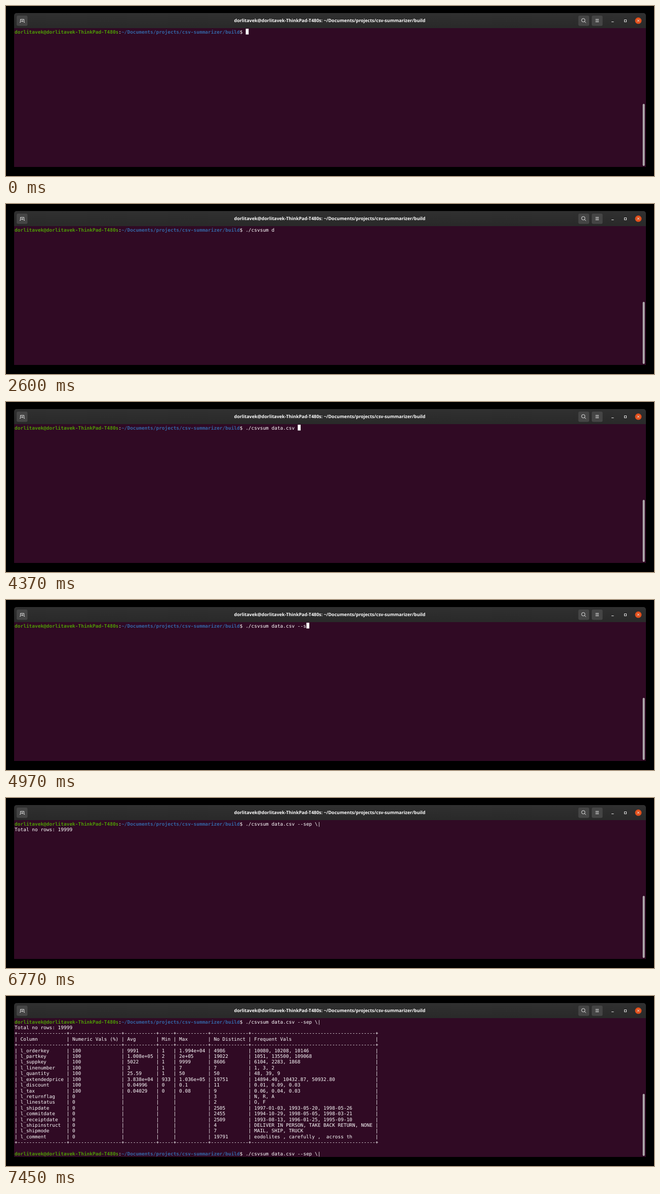
These frames come from a looping animation (1280 px wide and 338 px high, 8 s). An HTML page:

```html
<!DOCTYPE html>
<html lang="en">
<head>
<meta charset="utf-8">
<title>Terminal</title>
<style>
  html, body { margin: 0; width: 100%; height: 100%; overflow: hidden; background: #000; }
  svg { display: block; width: 1280px; height: 338px; }
  text { white-space: pre; text-rendering: geometricPrecision; fill: #fff; }
  .title { font: bold 8.97px "Open Sans", sans-serif; text-anchor: middle; }
  #screen text { font: 9.478px "DejaVu Sans Mono", monospace; }
  .user { fill: #4e9a06; font-weight: bold; }
  .path { fill: #3465a4; font-weight: bold; }
  .button { fill: #454545; }
  .icon { fill: none; stroke: #e4e4e4; }
</style>
</head>
<body>
<svg viewBox="0 0 1280 338">
  <defs>
    <linearGradient id="bar" x2="0" y2="1">
      <stop stop-color="#303030"/><stop offset="1" stop-color="#292929"/>
    </linearGradient>
    <rect id="button" width="21.5" height="20.5" rx="3"/>
  </defs>
  <path d="M16 44V19a5 5 0 0 1 5-5H1259a5 5 0 0 1 5 5V44z" fill="url(#bar)"/>
  <path d="M16 44H1264V320H16z" fill="#300a24"/>

  <g class="button">
    <use href="#button" x="21" y="19"/>
    <use href="#button" x="1130.5" y="19"/>
    <use href="#button" x="1157" y="19"/>
  </g>
  <g class="icon">
    <path d="M27 32.5h1.5v-6h7v6h1.5M32 28v4M30 30h4"/>
    <circle cx="1140.3" cy="28.3" r="3.4"/>
    <path d="M1142.8 30.8l2.7 2.7M1164.5 26.5h6.5m-6.5 2.5h6.5m-6.5 2.5h6.5M1196 31.5h4.5"/>
    <rect x="1221.5" y="27.5" width="4" height="4"/>
  </g>
  <circle cx="1249" cy="29.2" r="6.4" fill="#e2501c"/>
  <path class="icon" d="M1246.8 27l4.4 4.4m0-4.4l-4.4 4.4"/>
  <rect x="1257.7" y="194.5" width="4" height="123.5" rx="2" fill="#aeaaac"/>

  <text class="title" x="639.5" y="32.3">dorlitavek@dorlitavek-ThinkPad-T480s: ~/Documents/projects/csv-summarizer/build</text>
  <g id="screen"></g>
</svg>

<script>
const LEFT = 17.1, TOP = 45.2, CELL = 5.706, ROW = 2 * CELL, ASCENT = 9.4;
const LOOP = 8000, PROMPT_LENGTH = 80;
const PROMPT = '<tspan class="user">dorlitavek@dorlitavek-ThinkPad-T480s</tspan>:' +
  '<tspan class="path">~/Documents/projects/csv-summarizer/build</tspan>$ ';

// bursts of typing: text, start, time between keys
const BURSTS = [
  ['./', 790, 300], ['csv', 1420, 110], ['su', 1830, 110], ['m ', 2140, 110], ['d', 2600, 0],
  ['ata', 3070, 155], ['.csv ', 3960, 100], ['--s', 4720, 125], ['ep ', 5130, 90], ['\\|', 5850, 140]
];
const COMMAND = BURSTS.map(([text]) => text).join('');
const KEY_TIMES = BURSTS.flatMap(([text, start, gap]) => [...text].map((_, i) => start + i * gap));
const CURSOR_SPANS = [[0, 2140], [3960, 5310]];
const TOTAL_AT = 6770, TABLE_AT = 6870, RECALL_AT = 7450;

const RECORDS = `Column;Numeric Vals (%);Avg;Min;Max;No Distinct;Frequent Vals
l_orderkey;100;9991;1;1.994e+04;4986;10080, 10208, 10146
l_partkey;100;1.008e+05;2;2e+05;19022;1051, 135500, 109068
l_suppkey;100;5022;1;9999;8606;6104, 2283, 1868
l_linenumber;100;3;1;7;7;1, 3, 2
l_quantity;100;25.59;1;50;50;48, 39, 9
l_extendedprice;100;3.838e+04;933;1.036e+05;19751;14894.40, 10432.87, 50932.80
l_discount;100;0.04996;0;0.1;11;0.01, 0.09, 0.03
l_tax;100;0.04029;0;0.08;9;0.06, 0.04, 0.03
l_returnflag;0;;;;3;N, R, A
l_linestatus;0;;;;2;O, F
l_shipdate;0;;;;2505;1997-01-03, 1993-05-20, 1998-05-26
l_commitdate;0;;;;2455;1994-10-29, 1998-05-05, 1998-03-21
l_receiptdate;0;;;;2509;1993-08-13, 1996-01-25, 1995-09-10
l_shipinstruct;0;;;;4;DELIVER IN PERSON, TAKE BACK RETURN, NONE
l_shipmode;0;;;;7;MAIL, SHIP, TRUCK
l_comment;0;;;;19791;eodolites , carefully ,  across th`.split('\n').map(record => record.split(';'));

function tableLines() {
  const widths = RECORDS[0].map((_, i) => Math.max(...RECORDS.map(cells => cells[i].length)));
  const rule = '+' + widths.map(w => '-'.repeat(w + 2) + '+').join('');
  const [head, ...body] = RECORDS.map(cells =>
    '|' + cells.map((cell, i) => ` ${cell.padEnd(widths[i])} |`).join(''));
  return [rule, head, rule, ...body, rule];
}

const line = (content, row) =>
  `<text x="${LEFT}" y="${TOP + row * ROW + ASCENT}">${content}</text>`;

const output = [...tableLines(), '', PROMPT + '<tspan id="recalled"></tspan>'];
document.getElementById('screen').innerHTML =
  line(PROMPT + '<tspan id="typed"></tspan>', 0) +
  `<rect id="cursor" y="${TOP}" width="${CELL}" height="${ROW}" fill="#fff"/>` +
  `<g id="total">${line('Total no rows: 19999', 1)}</g>` +
  `<g id="table">${output.map((content, i) => line(content, i + 2)).join('')}</g>`;

const [typed, cursor, total, table, recalled] =
  ['typed', 'cursor', 'total', 'table', 'recalled'].map(id => document.getElementById(id));
const show = (element, on) => element.setAttribute('visibility', on ? 'visible' : 'hidden');

function draw(t) {
  const count = KEY_TIMES.filter(time => time <= t).length;
  typed.textContent = COMMAND.slice(0, count);
  cursor.setAttribute('x', LEFT + (PROMPT_LENGTH + count) * CELL);
  show(cursor, CURSOR_SPANS.some(([from, to]) => t >= from && t < to));
  show(total, t >= TOTAL_AT);
  show(table, t >= TABLE_AT);
  recalled.textContent = t >= RECALL_AT ? COMMAND : '';
}

const begin = performance.now();
function tick() {
  draw((performance.now() - begin) % LOOP);
  requestAnimationFrame(tick);
}
tick();
</script>
</body>
</html>
```
